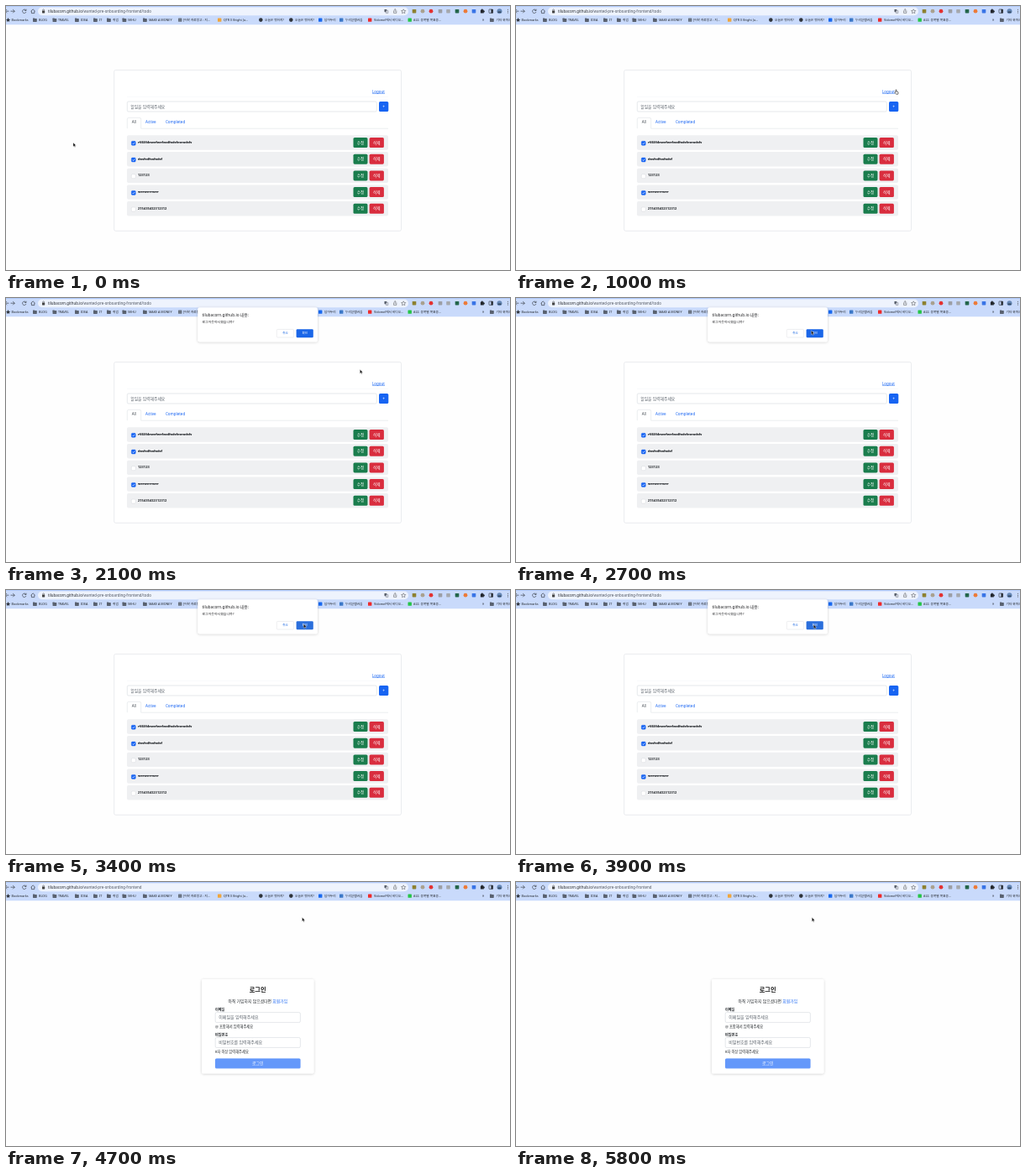
Write an HTML page that moves like this. It is 600 px wide and 315 px high and loops after 5900 ms.

```html
<!DOCTYPE html>
<html lang="ko">
<head>
<meta charset="utf-8">
<title>Todo logout</title>
<style>
  html, body { margin: 0; width: 100%; height: 100%; overflow: hidden; background: #fefefe; }
  svg { display: block; width: 600px; height: 315px; font-weight: 500; }
  text { font-family: "Noto Sans", "Noto Sans CJK KR", "Noto Sans CJK JP", sans-serif; white-space: pre; }
</style>
</head>
<body>
<svg id="stage" viewBox="0 0 600 315" xmlns="http://www.w3.org/2000/svg">
  <defs>
    <filter id="soft" x="-10%" y="-20%" width="120%" height="150%">
      <feDropShadow dx="0" dy="0.6" stdDeviation="1.5" flood-color="#000" flood-opacity="0.2"/>
    </filter>
  </defs>
  <g id="todo"></g>
  <g id="login"></g>
  <g id="chrome"></g>
  <g id="dialog"></g>
  <g id="cursor">
    <path id="arrow" d="M0 0V4.9L1.15 3.85 1.9 5.5 2.75 5.1 2 3.5H3.5Z" fill="#111" stroke="#fff" stroke-width=".35"/>
    <path id="hand" d="M-.5 .2Q0-.4.5.2V2L2.2 2.5Q2.7 2.7 2.6 3.4L2.2 5.2H0L-1.6 3.2Q-1.4 2.4-.5 3Z" fill="#fff" stroke="#111" stroke-width=".6"/>
  </g>
</svg>
<script>
const LOOP = 5900, STEP = 100;
const OPEN = 1800, LEAVE = 4000;
const SITE = 'tilubacorn.github.io';
const BLUE = '#1764f2';
const $ = id => document.getElementById(id);

// Text is placed by its vertical centre.
const text = (x, cy, str, size, fill = '#212529', extra = '') =>
  `<text x="${x}" y="${cy + size * 0.35}" font-size="${size}" fill="${fill}" ${extra}>${str}</text>`;
const rect = (x, y, w, h, fill, r = 0, extra = '') =>
  `<rect x="${x}" y="${y}" width="${w}" height="${h}" rx="${r}" fill="${fill}" ${extra}/>`;
const dot = (x, y, r, fill) => `<circle cx="${x}" cy="${y}" r="${r}" fill="${fill}"/>`;
const line = (d, color = '#3a4048', w = 0.7) =>
  `<path d="${d}" fill="none" stroke="${color}" stroke-width="${w}"/>`;
const edge = (color, w = 0.6) => `stroke="${color}" stroke-width="${w}"`;
const MID = 'text-anchor="middle"';
const BOLD = 'font-weight="700"';

function button(x, y, w, h, fill, label, size = 4.7) {
  return rect(x, y, w, h, fill, 1.6) + text(x + w / 2, y + h / 2, label, size, '#fff', MID);
}

function field(x, y, w, hint, size) {
  return rect(x, y, w, 12, '#fff', 1.6, edge('#d3d8dd')) + text(x + 4, y + 6, hint, size, '#596069');
}

function browserBar() {
  const folder = x => rect(x, 15, 4.8, 3.9, '#5a6270', 0.6) + rect(x, 14.4, 2.3, 1.6, '#5a6270', 0.4);
  const globe = x => dot(x + 2.3, 16.6, 2.3, '#30343b');
  const square = color => x => rect(x, 14.4, 4.4, 4.4, color, 0.6);
  const marks = [
    [32, 39, 'BLOG', folder], [55.5, 62, 'TRAVEL', folder], [82, 89, 'IDEA', folder],
    [104, 111, 'IT', folder], [120, 127, '취업', folder], [138.5, 145, 'SKHU', folder],
    [163, 170, 'MAKE A MONEY', folder], [205, 211, '[어학 자료창고 : 지...', square('#6c7684')],
    [252, 259, 'QTR X Bright Ja...', square('#f0a63c')],
    [301, 308, '오늘은 뭐하지?', globe], [337, 344, '오늘은 뭐하지?', globe],
    [372, 379, '담아두리', square('#1768f0')], [397, 404, '누리길멤버십', square('#3c78c8')],
    [431, 438, 'Vidomel에서 비디오...', square('#ee2b2b')],
    [478.5, 485, '#22. 종목별 목표종...', square('#25c447')]
  ];
  const plugins = [
    [486, '#8d8130', 1], [496, '#a9a18f', 0], [506, '#e33232', 0], [517, '#9b9ea4', 1],
    [526.5, '#a5a8ad', 1], [537, '#24664b', 1], [547, '#ec7b3a', 0], [557, '#3974e6', 1]
  ];
  let s = rect(0, 0, 600, 22.3, '#c9dafb') + rect(0, 0, 600, 0.8, '#a9c5f8') +
    rect(38, 1.6, 441, 9.6, '#eef3fd', 4.8);
  s += line('M5.5 6.2h4.8M8.2 4.1l2.1 2.1-2.1 2.1M3.4 6.2H-1M1 4.1l-2.1 2.1L1 8.3');
  s += line('M23.7 5.2A2.2 2.2 0 1 0 23.9 7M24 3.7v1.8h-1.8');
  s += line('M29.6 6.2l2.5-2.3 2.5 2.3M30.4 5.8v2.8h3.4v-2.8');
  s += rect(43, 5.6, 3.2, 2.8, '#444', 0.4) + line('M43.6 5.6v-.7a1 1 0 0 1 2 0v.7', '#444', 0.5);
  s += text(50, 6.2, `${SITE}<tspan fill="#4d545f">/wanted-pre-onboarding-frontend<tspan id="route">/todo</tspan></tspan>`, 4.43);
  s += rect(450.5, 4, 2.8, 3.2, '#555c68', 0.4) + rect(452.3, 5.4, 2.6, 3.2, '#d8dce4', 0.4, edge('#555c68', 0.4));
  s += line('M461.6 5.4v3h3.2v-3M463.2 7v-3.4l-1 1m1-1l1 1', '#444', 0.5);
  s += line('M473.2 3.8l.8 1.6 1.8.2-1.3 1.3.3 1.8-1.6-.9-1.6.9.3-1.8-1.3-1.3 1.8-.2z', '#444', 0.5);
  for (const [x, color, boxy] of plugins)
    s += boxy ? rect(x - 2.3, 3.9, 4.6, 4.6, color, 0.7) : dot(x, 6.2, 2.4, color);
  s += rect(564.9, 4.6, 3.9, 3.9, '#23272d', 0.5) + dot(566.8, 4.4, 0.9, '#23272d') + dot(569, 6.5, 0.9, '#23272d');
  s += rect(575, 4, 4.6, 4.4, 'none', 0.5, edge('#23272d')) + rect(577.5, 4, 2.1, 4.4, '#23272d');
  s += dot(587.5, 6.2, 3, '#6587b5') + rect(585.3, 6.4, 4.4, 1.7, '#34475e', 0.8);
  for (const y of [4.3, 6.2, 8.1]) s += dot(597.5, y, 0.5, '#444');
  s += `<path d="M2.5 14l.8 1.7 1.8.2-1.3 1.3.3 1.8-1.6-.9-1.6.9.3-1.8-1.3-1.3 1.8-.2z" fill="#30363f"/>`;
  s += text(6.5, 16.6, 'Bookmarks', 3.75);
  for (const [ix, tx, label, icon] of marks) s += icon(ix) + text(tx, 16.6, label, 3.7);
  return s + text(567, 16.3, '»', 4.5) + folder(576) + text(583.5, 16.6, '기타 북마크', 3.7);
}

function todoPage() {
  const items = [
    ['rS3234ewefwefasdfadsfezeadsfs', 1], ['dasfsdfsafadsf', 1], ['123123', 0],
    ['werwerrwer', 1], ['215435432312312', 0]
  ];
  const struck = 'style="text-decoration: line-through; text-decoration-thickness: .3px"';
  let s = rect(128.7, 76.4, 341.8, 192, '#fff', 2, edge('#dcdfe4'));
  s += text(436, 102, 'Logout', 4.5, BLUE, 'text-decoration="underline"');
  s += line('M144 108.3H455', '#f3f4f6', 0.5);
  s += field(144.3, 114, 297, '할일을 입력해주세요', 4.8) + button(444, 114, 11.3, 12, BLUE, '+', 5);
  s += line('M144.3 146.2V135q0-1.6 1.6-1.6h13.2q1.6 0 1.6 1.6v11.2H455', '#dee2e6', 0.6);
  s += text(149.7, 138.5, 'All', 4.5, '#495057') + text(166, 138.5, 'Active', 4.5, BLUE) +
    text(190, 138.5, 'Completed', 4.5, BLUE);
  items.forEach(([label, done], i) => {
    const y = 163 + i * 19.7;
    s += rect(144, y - 8.7, 311, 17.4, '#eff0f2', 1.8);
    s += rect(149.3, y - 1.7, 5, 5, done ? BLUE : '#fff', 1.2, edge(done ? BLUE : '#ced1d6', 0.4));
    if (done) s += line(`M150.5 ${y + 0.9}l1 1 1.8-2`, '#fff', 0.7);
    s += text(157, y - 0.4, label, 4, '#212529', 'font-weight="600" ' + (done ? struck : ''));
    s += button(413.5, y - 6, 17, 12, '#1a7d4d', '수정') + button(432.6, y - 6, 17.3, 12, '#d92d3e', '삭제');
  });
  return s;
}

function loginPage() {
  let s = rect(233, 116, 133.5, 112.6, '#fff', 2, 'filter="url(#soft)"');
  s += text(299.6, 128.2, '로그인', 7.2, '#111', `${MID} ${BOLD}`);
  s += text(299.8, 142.2, `아직 가입하지 않으셨다면 <tspan fill="${BLUE}">회원가입</tspan>`, 4.85, '#212529', MID);
  const entries = [
    [153, '이메일', '이메일을 입력해주세요', '@ 포함해서 입력해주세요'],
    [183, '비밀번호', '비밀번호를 입력해주세요', '8자 이상 입력해주세요']
  ];
  for (const [y, label, hint, help] of entries)
    s += text(249, y, label, 4.15, '#212529', BOLD) + field(249.2, y + 2.6, 101.2, hint, 5) +
      text(249, y + 20, help, 4.25);
  return s + button(249, 210.4, 101.6, 12.2, '#6498fa', '로그인', 5);
}

function confirmBox() {
  return rect(228.3, 11.3, 142.6, 41, '#fff', 2, 'filter="url(#soft)"') +
    text(233.5, 20, `${SITE} 내용:`, 4.75, '#202124') +
    text(233.5, 29, '로그아웃하시겠습니까?', 3.95, '#202124') +
    rect(322.3, 37.4, 20.4, 9.6, '#fff', 1.3, edge('#dadce0', 0.5)) +
    text(332.5, 42.2, '취소', 3.6, '#1a68e0', MID) +
    rect(345.6, 37.2, 20.2, 10, '#1a66e8', 1.3, 'id="ok"') +
    text(355.7, 42.2, '확인', 3.6, '#fff', MID);
}

$('chrome').innerHTML = browserBar();
$('todo').innerHTML = todoPage();
$('login').innerHTML = loginPage();
$('dialog').innerHTML = confirmBox();

// Pointer path: time, x, y
const path = [
  [0, 80, 163], [100, 80, 163], [900, 452.5, 100], [1000, 452.5, 100], [1200, 446.5, 101.3],
  [1700, 445.8, 101.5], [1900, 445.8, 101.5], [2500, 351.5, 38.8], [2800, 351.5, 38.8],
  [3300, 354.3, 40.5], [4000, 354.3, 41.3], [4300, 354.3, 41.3], [4800, 352.3, 42.3], [LOOP, 352.3, 42.3]
];

function pointer(t) {
  const i = path.findIndex(p => p[0] > t);
  const [t0, x0, y0] = path[i - 1], [t1, x1, y1] = path[i];
  const u = (t - t0) / (t1 - t0), k = u * u * (3 - 2 * u);
  return [x0 + (x1 - x0) * k, y0 + (y1 - y0) * k];
}

// The confirm box enters and leaves with one half-faded, lifted step.
function dialogPose(t) {
  if (t < OPEN || t >= LEAVE + STEP) return [0, 0, 1];
  const half = t < OPEN + STEP || t >= LEAVE;
  return half ? [0.45, -3.7, 0.98] : [1, 0, 1];
}

const show = (id, on) => $(id).setAttribute('visibility', on ? 'visible' : 'hidden');

function draw(t) {
  const out = t >= LEAVE;
  show('todo', !out);
  show('login', out);
  $('route').textContent = out ? '' : '/todo';

  const [alpha, lift, scale] = dialogPose(t);
  $('dialog').setAttribute('opacity', alpha);
  $('dialog').setAttribute('transform',
    `translate(${299.6 * (1 - scale)} ${lift + 31 * (1 - scale)}) scale(${scale})`);
  $('ok').setAttribute('fill', t >= 3100 ? '#2b6fdc' : '#1a66e8');

  const [x, y] = pointer(t);
  const link = t >= 900 && t < 1700;
  $('cursor').setAttribute('transform', `translate(${x} ${y})`);
  show('hand', link);
  show('arrow', !link);
}

const start = performance.now();
function tick() {
  const t = (performance.now() - start) % LOOP;
  draw(Math.floor(t / STEP) * STEP);
  requestAnimationFrame(tick);
}
tick();
</script>
</body>
</html>
```
